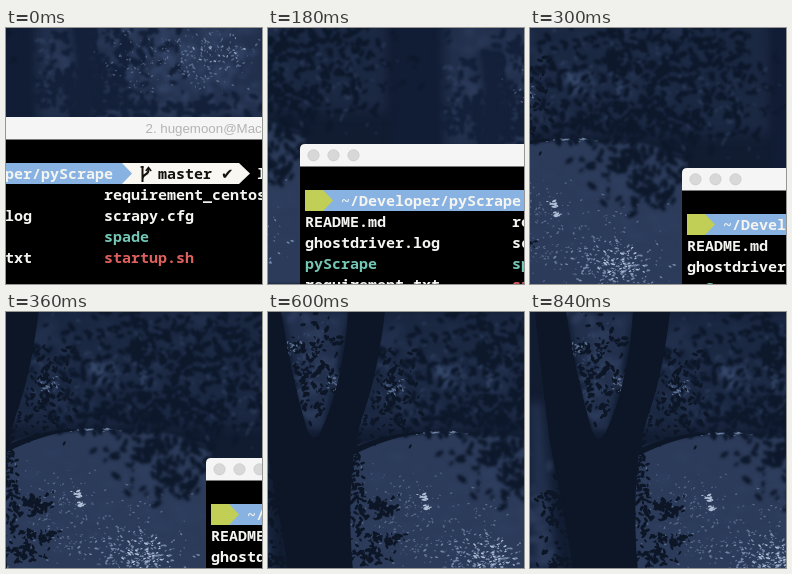
Write an HTML page with a canvas that moves like this. It is 256 px wide and 256 px high and loops after 2.4 s.

```html
<!DOCTYPE html>
<html lang="en">
<head>
<meta charset="utf-8">
<style>
  html, body { margin: 0; width: 100%; height: 100%; overflow: hidden; background: #0c1729; }
  #stage { position: relative; width: 256px; height: 256px; overflow: hidden; }
  #world { position: absolute; left: 0; top: 0; width: 690px; height: 320px; }
  canvas, svg { position: absolute; left: 0; top: 0; display: block; }
  .mono { font: 600 15px "Noto Sans Mono", "DejaVu Sans Mono", monospace; white-space: pre; }
</style>
</head>
<body>
<div id="stage"><div id="world">
  <canvas id="forest" width="690" height="320"></canvas>
  <svg width="690" height="320">
    <path d="M307 320V155q0-5 5-5H690V320z" fill="#000"/>
    <path d="M307 172.5V155q0-5 5-5H690V172.5z" fill="#f6f5f6"/>
    <g fill="#d9d8d9" stroke="#cbcacb" stroke-width=".8">
      <circle cx="320.5" cy="161.3" r="5.6"/>
      <circle cx="340.5" cy="161.3" r="5.6"/>
      <circle cx="360.5" cy="161.3" r="5.6"/>
    </g>
    <text x="560.5" y="166" font-family="Liberation Sans, Arial, sans-serif" font-size="13.3" fill="#b4b3b4">2. hugemoon@Mac</text>
    <path d="M537 196H654l11 10.5L654 217H537z" fill="#f8f7f2"/>
    <path d="M330 196H537l10 10.5L537 217H330z" fill="#88b2e2"/>
    <path d="M312 196H330l10 10.5L330 217H312z" fill="#c2cf56"/>
    <g fill="none" stroke="#15120d" stroke-width="2">
      <path d="M557.5 199V215M557.5 212q0-3 3-4.5t3-4.5V202"/>
      <path d="M560.8 204l2.7-3.5 2.7 3.5M555.5 200h3" stroke-width="1.5"/>
    </g>
    <g id="listing"></g>
  </svg>
</div></div>
<script>
const CELL = 9, LEFT = 312, ROW = 21;
const TEAL = '#74c7b5', RED = '#e0605d', WHITE = '#f4f4f0', INK = '#15120d';

function type(text, column, baseline, fill = WHITE) {
  const node = document.createElementNS('http://www.w3.org/2000/svg', 'text');
  node.setAttribute('class', 'mono');
  node.setAttribute('x', LEFT + column * CELL);
  node.setAttribute('y', baseline);
  node.style.fill = fill;
  node.textContent = text;
  document.getElementById('listing').append(node);
  return node;
}

type('~/Developer/pyScrape', 4, 212);
type('master', 29, 212, INK);
type('✔', 36, 212, INK).style.fontFamily = '"DejaVu Sans", sans-serif';
type('l', 40, 212);
[
  ['README.md', 'requirement_centos.txt'],
  ['ghostdriver.log', 'scrapy.cfg'],
  ['pyScrape', 'spade', TEAL, TEAL],
  ['requirement.txt', 'startup.sh', WHITE, RED]
].forEach(([a, b, colorA, colorB], i) => {
  type(a, 0, 233 + i * ROW, colorA);
  type(b, 23, 233 + i * ROW, colorB);
});

// Wallpaper: a moonlit pond behind trees
const ctx = document.getElementById('forest').getContext('2d');
const DARK = '#0c1626', LEAF = '#0d182b', SHADE = '#142039', MID = '#22304d',
      WATER = '#2c3b5a', HAZE = '#36486b', PALE = '#7286a8', GLINT = '#b0bfd6';
let seed = 7;
const random = () => (seed = (seed * 16807) % 2147483647) / 2147483647;
const spread = () => random() + random() - 1;

function shape(path, color, blur = 0) {
  ctx.filter = blur ? `blur(${blur}px)` : 'none';
  ctx.fillStyle = color;
  ctx.fill(new Path2D(path));
  ctx.filter = 'none';
}

// Scatter leaf-shaped flecks around a centre
function scatter(count, cx, cy, rx, ry, color, size, { flat = 0.5, tilt = 1.5, blur = 0, alpha = 1 } = {}) {
  ctx.filter = blur ? `blur(${blur}px)` : 'none';
  ctx.globalAlpha = alpha;
  ctx.fillStyle = color;
  ctx.beginPath();
  for (let i = 0; i < count; i++) {
    const x = cx + spread() * rx, y = cy + spread() * ry;
    const r = size * (0.4 + random() * 0.8), angle = (random() - 0.5) * 2 * tilt;
    ctx.moveTo(x + r * Math.cos(angle), y + r * Math.sin(angle));
    ctx.ellipse(x, y, r, r * flat, angle, 0, 7);
  }
  ctx.fill();
  ctx.filter = 'none';
  ctx.globalAlpha = 1;
}

function paintForest() {
  ctx.fillStyle = '#111c31';
  ctx.fillRect(0, 0, 690, 320);

  // distant light
  shape('M38 0H104L78 118H62z', MID, 3);
  shape('M0 90H12L28 260H0z', MID, 5);
  shape('M110 0H395V118H110z', '#1b2842', 6);
  scatter(40, 68, 55, 38, 65, WATER, 7, { blur: 2 });
  scatter(30, 5, 200, 22, 65, WATER, 6, { blur: 2 });
  scatter(45, 150, 65, 36, 60, MID, 7, { blur: 3 });
  scatter(80, 250, 60, 140, 70, MID, 8, { blur: 3 });
  scatter(18, 200, 62, 22, 18, HAZE, 4, { blur: 2 });
  scatter(16, 147, 78, 16, 14, HAZE, 4, { blur: 1 });

  // pond
  shape('M104 137Q150 122 215 122Q260 118 312 140V290H100z', WATER, 1.5);
  scatter(70, 205, 200, 115, 60, HAZE, 8, { flat: 0.25, tilt: 0.2, blur: 3, alpha: 0.45 });
  scatter(24, 192, 122, 32, 2.5, PALE, 2, { flat: 0.35, tilt: 0.2 });
  scatter(210, 200, 218, 105, 60, PALE, 1.3, { tilt: 0.8, alpha: 0.65 });
  scatter(70, 150, 200, 42, 55, PALE, 1.3, { alpha: 0.6 });
  scatter(10, 178, 186, 9, 4, GLINT, 2.6, { flat: 0.4, tilt: 0.5 });
  scatter(9, 182, 197, 9, 4, GLINT, 2.4, { flat: 0.4, tilt: 0.5 });
  scatter(190, 240, 247, 62, 30, PALE, 1.7, { tilt: 0.9 });
  scatter(60, 248, 246, 28, 18, GLINT, 1.5, { tilt: 0.9 });

  // canopy
  scatter(360, 255, 45, 145, 85, LEAF, 5, { blur: 1 });
  scatter(170, 245, 102, 105, 26, LEAF, 5, { blur: 1 });
  scatter(75, 255, 135, 72, 27, LEAF, 5, { blur: 1.5 });
  scatter(75, 262, 155, 58, 34, LEAF, 5, { blur: 1.5 });
  scatter(45, 277, 172, 30, 30, LEAF, 5, { blur: 1.5 });
  scatter(70, 225, 55, 95, 60, HAZE, 2.6, { blur: 1, alpha: 0.5 });
  scatter(10, 198, 62, 12, 8, HAZE, 4, { blur: 1.5 });
  scatter(8, 245, 70, 4, 12, HAZE, 3, { blur: 1, alpha: 0.7 });
  scatter(22, 150, 76, 13, 9, PALE, 1.8, { alpha: 0.7 });
  scatter(140, 145, 85, 38, 60, DARK, 3.2);
  scatter(150, 70, 58, 34, 68, DARK, 3.4);
  scatter(45, 65, 48, 28, 50, HAZE, 1.7, { alpha: 0.7 });
  scatter(18, 88, 72, 7, 12, PALE, 1.6, { alpha: 0.7 });
  scatter(14, 48, 36, 9, 9, PALE, 1.6, { alpha: 0.8 });

  // near tree with its fork
  shape('M5 0H36Q46 65 62 119Q69 134 76 120Q99 70 103 0H140Q133 60 120 98Q108 130 106 170Q104 220 108 260H44Q32 190 20 130Q12 70 5 0z', DARK, 0.7);
  shape('M102 140Q140 121 178 121L178 122.5Q145 125 106 145z', DARK);
  scatter(130, 109, 165, 13, 80, DARK, 3);
  scatter(55, 132, 196, 28, 14, DARK, 3.2);
  scatter(45, 142, 229, 24, 9, DARK, 3);
  scatter(50, 122, 246, 28, 10, DARK, 3);
  scatter(50, 24, 205, 20, 55, DARK, 3.2);
  scatter(30, 28, 185, 14, 14, DARK, 3);
  scatter(40, 30, 248, 24, 10, DARK, 3.2);

  // far bank on the right
  shape('M450 0H690V160H450z', MID, 8);
  scatter(130, 570, 88, 125, 75, WATER, 9, { blur: 3 });
  scatter(80, 600, 92, 95, 50, HAZE, 6, { blur: 2, alpha: 0.7 });
  scatter(190, 520, 85, 85, 75, SHADE, 6, { blur: 1 });
  scatter(110, 500, 125, 60, 28, SHADE, 6, { blur: 1 });
  scatter(60, 600, 140, 100, 14, SHADE, 6, { blur: 1 });
  scatter(110, 560, 92, 60, 38, PALE, 1.3, { alpha: 0.55 });
  scatter(130, 630, 92, 55, 36, PALE, 1.6, { alpha: 0.6 });
  scatter(30, 625, 83, 38, 20, GLINT, 1.5, { alpha: 0.7 });
  shape('M396 0H447Q441 70 449 155H396Q403 80 396 0z', '#111d35', 3);
  shape('M485 55Q494 95 486 155H510Q505 100 512 55z', SHADE, 3);
  scatter(120, 360, 70, 75, 72, LEAF, 5, { blur: 1 });
  scatter(45, 350, 95, 60, 55, HAZE, 2.8, { blur: 1, alpha: 0.5 });
  scatter(20, 461, 105, 10, 45, HAZE, 3, { blur: 1, alpha: 0.6 });
}
paintForest();

// Camera path: time, x, y
const path = [
  [0, -421, -61], [120, -334, -47], [240, -213, -20], [360, -107, -4],
  [480, -71, -2], [600, -23, -1], [840, 0, 0]
];
const LOOP = 2400, TICK = 60;

function slope(i, axis) {
  if (i === path.length - 1) return 0;
  const a = path[Math.max(i - 1, 0)], b = path[i + 1];
  return (b[axis] - a[axis]) / (b[0] - a[0]);
}

function glide(t, axis) {
  const i = path.findIndex(p => p[0] > t) - 1;
  if (i < 0) return path[path.length - 1][axis];
  const a = path[i], b = path[i + 1], span = b[0] - a[0], u = (t - a[0]) / span;
  const ease = u * u * (3 - 2 * u);
  return a[axis] + (b[axis] - a[axis]) * ease
    + span * u * (1 - u) * ((1 - u) * slope(i, axis) - u * slope(i + 1, axis));
}

const world = document.getElementById('world');
const start = performance.now();

function render() {
  const t = Math.floor(((performance.now() - start) % LOOP) / TICK) * TICK;
  world.style.transform = `translate(${Math.round(glide(t, 1))}px, ${Math.round(glide(t, 2))}px)`;
  requestAnimationFrame(render);
}
render();
</script>
</body>
</html>
```
